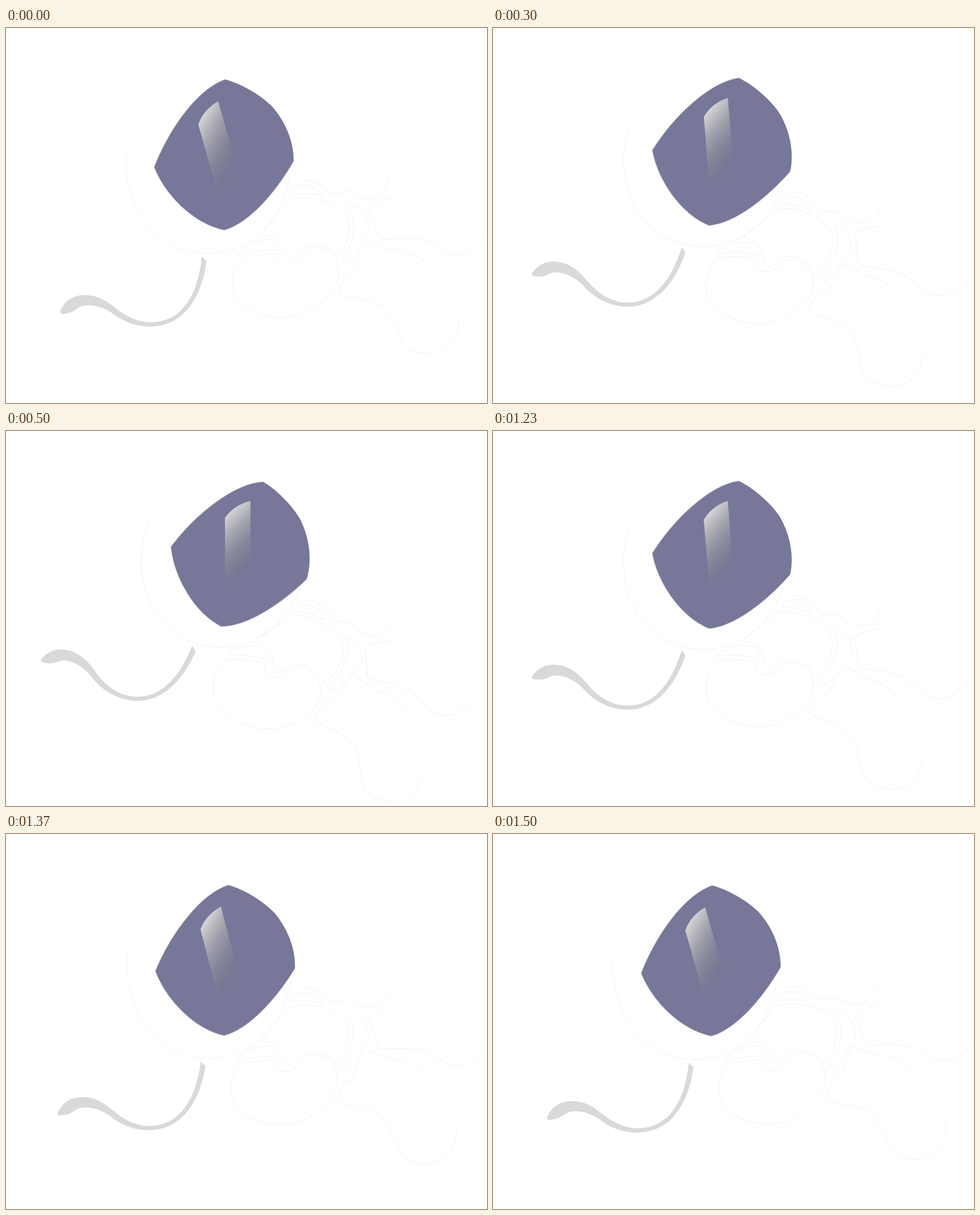
Write an HTML page that moves like this. It is 848 px wide and 660 px high and loops after 2010 ms.

```html
<!DOCTYPE html>
<html lang="en">
<head>
<meta charset="utf-8">
<title>Floating astronaut</title>
<style>
  html, body { margin: 0; width: 100%; height: 100%; overflow: hidden; background: #fff; }
  svg { display: block; width: 100%; height: 100%; }
  .outline { fill: none; stroke: #f0f0f0; stroke-width: .8; }
</style>
</head>
<body>
<svg viewBox="0 0 848 660">
  <defs>
    <linearGradient id="shine" gradientUnits="userSpaceOnUse" x1="344" y1="155" x2="433" y2="205">
      <stop stop-color="#d9d9d9"/>
      <stop offset="1" stop-color="#737373" stop-opacity="0"/>
    </linearGradient>
  </defs>
  <g id="astronaut">
    <g class="outline">
      <!-- helmet -->
      <path d="M212 215C207 270 225 340 285 378C330 405 385 402 432 375C470 350 495 305 500 255"/>
      <!-- torso and backpack -->
      <path d="M447 362C465 345 482 322 495 306C510 297 530 297 550 301C575 306 595 315 603 335C610 360 600 390 583 404"/>
      <path d="M503 293C505 280 515 275 528 277C545 279 553 286 556 294C540 291 520 291 503 293Z"/>
      <path d="M518 270C540 265 560 275 570 292C585 293 592 287 603 287C615 293 620 299 636 300C655 300 672 290 674 265"/>
      <!-- belt -->
      <path d="M603 314C615 310 630 318 640 345C641 365 628 370 622 385C615 400 612 410 605 411C598 411 592 407 592 404C605 395 612 370 613 345C612 330 606 320 603 314Z"/>
      <!-- legs -->
      <path d="M680 298C665 303 650 310 638 322C648 335 650 355 657 370C670 375 690 368 725 372C760 375 770 398 795 400C820 399 840 382 842 362"/>
      <path d="M738 410C725 402 715 395 695 391C665 390 655 378 632 375C625 385 620 405 614 425C608 432 600 433 596 436C592 450 586 460 587 467C610 478 645 475 668 493C690 520 692 545 705 560C722 577 755 575 775 564C795 550 800 530 798 505"/>
      <!-- arm and glove -->
      <path d="M410 396C425 380 450 370 465 372C475 374 480 385 483 392C460 388 430 394 411 400Z"/>
      <path d="M447 364C470 365 480 370 488 388C497 405 502 408 508 404C520 395 515 385 535 382C560 378 580 392 585 405"/>
      <path d="M477 398C455 396 420 402 408 412C398 430 396 455 405 475C420 498 455 512 490 510C535 508 575 475 585 440C588 420 583 400 565 391C545 382 525 385 519 402C510 417 490 420 480 412C476 408 478 402 477 398Z"/>
    </g>
    <!-- tether -->
    <path fill="#d9d9d9" d="M346 403L353.5 410C346 469 317 525 254 525.5C228 525.5 206 516 190 504C172 490 148 485 132 490C122 495 118 503 97 503L95 499C102 483 115 470 140 470C165 470 182 484 200 498C215 509 235 518 255 518C305 518 337 478 345 404Z"/>
    <!-- visor with its pale rim -->
    <path fill="#779" d="M386 90.5C412 97 447 116 469 138C492 164 508 200 507 235C477 287 430 343 385 356C331 345 281 295 261 245C286 180 336 108 386 90.5Z"/>
    <path fill="none" stroke="#d0d0d8" d="M507 235C477 287 430 343 385 356C331 345 281 295 261 245C286 180 336 108 386 90.5"/>
    <path fill="url(#shine)" d="M374 129C358 138 345 152 339 170L380 314L415 272Z"/>
  </g>
</svg>
<script>
  const LOOP = 2010, TILT = 15.9;
  const STEPS = [230, 270, 300, 330, 370, 400, 430, 470, 500];
  const astronaut = document.getElementById('astronaut');

  // Cubic ease-out, advanced in hard steps
  const swing = time => {
    const done = STEPS.filter(step => time >= step).length / STEPS.length;
    return 1 - (1 - done) ** 3;
  };

  function draw() {
    const time = performance.now() % LOOP;
    const angle = TILT * (swing(time) - swing(time - 1000));
    astronaut.setAttribute('transform', `rotate(${angle} 424 330)`);
    requestAnimationFrame(draw);
  }
  draw();
</script>
</body>
</html>
```
